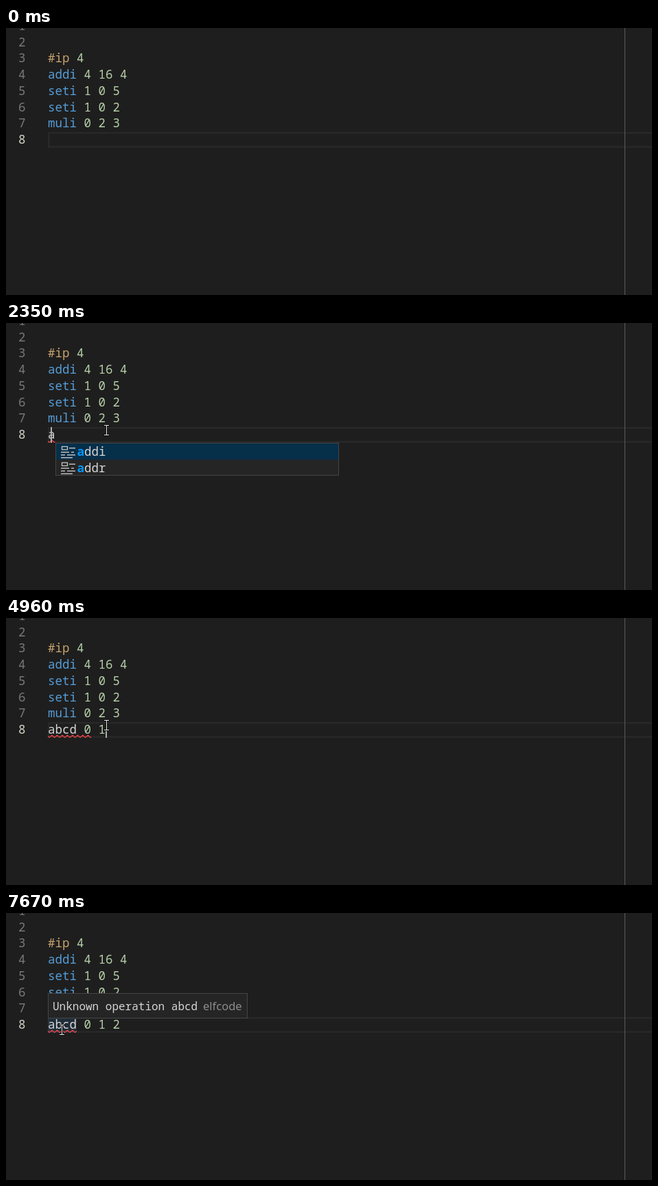
Animation, 941 px wide and 390 px high, one loop 8000 ms. Source, as an HTML page with a canvas:

```html
<!DOCTYPE html>
<html lang="en">
<head>
<meta charset="utf-8">
<title>Editor</title>
<style>
  html, body { margin: 0; width: 100%; height: 100%; overflow: hidden; background: #1e1e1e; }
  canvas { display: block; }
</style>
</head>
<body>
<canvas id="stage" width="941" height="390"></canvas>
<script>
const ctx = document.getElementById('stage').getContext('2d');
const LOOP = 8000;
const LEFT = 61, COL = 10.5, LINE = 23.75, BASE = 169;
const MONO = '"Noto Sans Mono", "DejaVu Sans Mono", monospace';
const SANS = '"Noto Sans", "Open Sans", sans-serif';
const CODE = '17.5px ' + MONO;
const BLUE = '#569cd6', GREEN = '#b5cea8', TAN = '#c8a26e', PLAIN = '#d4d4d4';

const program = [
  ['#ip', '4', 3], ['addi', '4 16 4', 4], ['seti', '1 0 5', 5],
  ['seti', '1 0 2', 6], ['muli', '0 2 3', 7]
];
const typed = 'abcd 0 1 2';
const keyTimes = [2350, 2530, 2710, 2960, 3700, 4330, 4640, 4820, 4980, 5150];
const GLIDE = 70;
const caretToggles = [920, 1420, 1850, 3530, 3700, 4200, 4330, 5650, 6100, 6640, 7050, 7670];
// [time, end column of the error underline]
const errors = [[2350, 1], [2780, 3], [3030, 4], [3840, 5], [4460, 6], [5280, 4]];
// [time, x, y] pointer positions after its entrance
const pointerStops = [
  [680, 146, 156], [860, 155, 148], [940, 150, 152], [1040, 146, 156],
  [5900, 141, 158], [5970, 122, 162], [6040, 102, 167], [6110, 89, 170],
  [6170, 86, 170], [6230, 83, 170], [6300, 81, 170]
];

const passed = (times, t) => times.filter(time => time <= t).length;
const latest = (list, t) => list.filter(item => item[0] <= t).pop();
const colX = col => LEFT + col * COL;

function rect(x, y, w, h, color) {
  ctx.fillStyle = color;
  ctx.fillRect(x, y, w, h);
}

function text(str, x, y, color, font = CODE) {
  ctx.font = font;
  ctx.fillStyle = color;
  ctx.fillText(str, x, y);
}

function panel(x, y, w, h) {
  rect(x, y, w, h, '#454545');
  rect(x + 1, y + 1, w - 2, h - 2, '#252526');
}

function drawEditor() {
  rect(0, 0, 941, 390, '#1e1e1e');
  const edge = '#282828';
  rect(LEFT, 152, 880, 2.5, edge);
  rect(LEFT, 172.5, 880, 2.5, edge);
  rect(LEFT, 152, 2.5, 23, edge);
  rect(901, 0, 1, 390, '#5a5a5a');
  for (let n = 1; n <= 8; n++) {
    text(n, 18, BASE - (8 - n) * LINE, n === 8 ? '#d2d6c8' : '#787878');
  }
  for (const [op, args, n] of program) {
    const y = BASE - (8 - n) * LINE;
    text(op, LEFT, y, op[0] === '#' ? TAN : BLUE);
    text(args, colX(op.length + 1), y, GREEN);
  }
}

function drawSquiggle(endCol) {
  const end = colX(endCol);
  ctx.save();
  ctx.beginPath();
  ctx.rect(LEFT, 170, end - LEFT, 6);
  ctx.clip();
  ctx.beginPath();
  for (let x = LEFT - 1.6, low = false; x < end + 4; x += 3.75, low = !low) {
    ctx.lineTo(x, low ? 174.4 : 171.3);
  }
  ctx.strokeStyle = '#f04545';
  ctx.lineWidth = 1.2;
  ctx.stroke();
  ctx.restore();
}

function drawInput(t) {
  const count = passed(keyTimes, t);
  if (t >= 6480) rect(LEFT, 152, 42, 23, 'rgba(38,79,120,.3)');
  const shown = typed.slice(0, count);
  text(shown.slice(0, 4), LEFT, BASE, PLAIN);
  text(shown.slice(5), colX(5), BASE, GREEN);
  const error = latest(errors, t);
  if (error) drawSquiggle(error[1]);

  if (passed(caretToggles, t) % 2) {
    const gliding = count && t - keyTimes[count - 1] < GLIDE;
    const x = gliding ? colX(count - 0.5) - 1 : colX(count);
    rect(Math.round(x), 152, 2, 23, '#aeafad');
  }
}

function drawKeywordIcon(y) {
  const color = '#c5c5c5';
  ctx.strokeStyle = color;
  ctx.lineWidth = 1.3;
  ctx.strokeRect(81.5, y + 0.5, 8, 4.5);
  rect(92, y + 2, 9, 1.4, color);
  rect(80, y + 8, 12, 1.4, color);
  rect(95, y + 8, 4, 1.4, color);
  rect(80, y + 12, 6, 1.4, color);
  rect(89, y + 12, 12, 1.4, color);
  rect(80, y + 16, 17, 1.4, color);
}

function drawSuggestions(t) {
  if (t < 2350 || t >= 2530) return;
  if (t >= 2420) panel(484, 175, 423, 65);
  panel(72, 175, 413, 48);
  rect(73, 176, 411, 23.5, '#062f4a');
  ['ddi', 'ddr'].forEach((rest, i) => {
    const y = 194 + i * 23.5;
    drawKeywordIcon(y - 14);
    text('a', 103.5, y, '#0097fb', 'bold ' + CODE);
    text(rest, 114, y, PLAIN);
  });
}

function drawHover(t) {
  if (t < 6480) return;
  ctx.globalAlpha = Math.min(1, (t - 6450) / 120);
  panel(61, 117, 291, 37);
  text('Unknown operation abcd', 68, 142, PLAIN, '16px ' + MONO);
  text('elfcode', 287, 142, '#8c8c8c', '16.5px ' + SANS);
  ctx.globalAlpha = 1;
}

function pointerAt(t) {
  if (t >= 680) return latest(pointerStops, t).slice(1);
  const p = Math.floor((t - 160) / 65) / 8;
  const ease = 1 - (1 - p) ** 2;
  return [Math.round(771 - 625 * ease), Math.round(386 - 230 * ease)];
}

function drawPointer(t) {
  if (t < 160) return;
  const [x, y] = pointerAt(t);
  const beam = (grow, color) => {
    rect(x - 3 - grow, y - 7 - grow, 7 + 2 * grow, 1 + 2 * grow, color);
    rect(x - 3 - grow, y + 7 - grow, 7 + 2 * grow, 1 + 2 * grow, color);
    rect(x - grow, y - 7, 1 + 2 * grow, 14, color);
  };
  beam(1, '#121212');
  beam(0, '#e6e6e6');
}

function frame(now) {
  const t = now % LOOP;
  drawEditor();
  drawInput(t);
  drawSuggestions(t);
  drawHover(t);
  drawPointer(t);
  requestAnimationFrame(frame);
}
requestAnimationFrame(frame);
</script>
</body>
</html>
```
